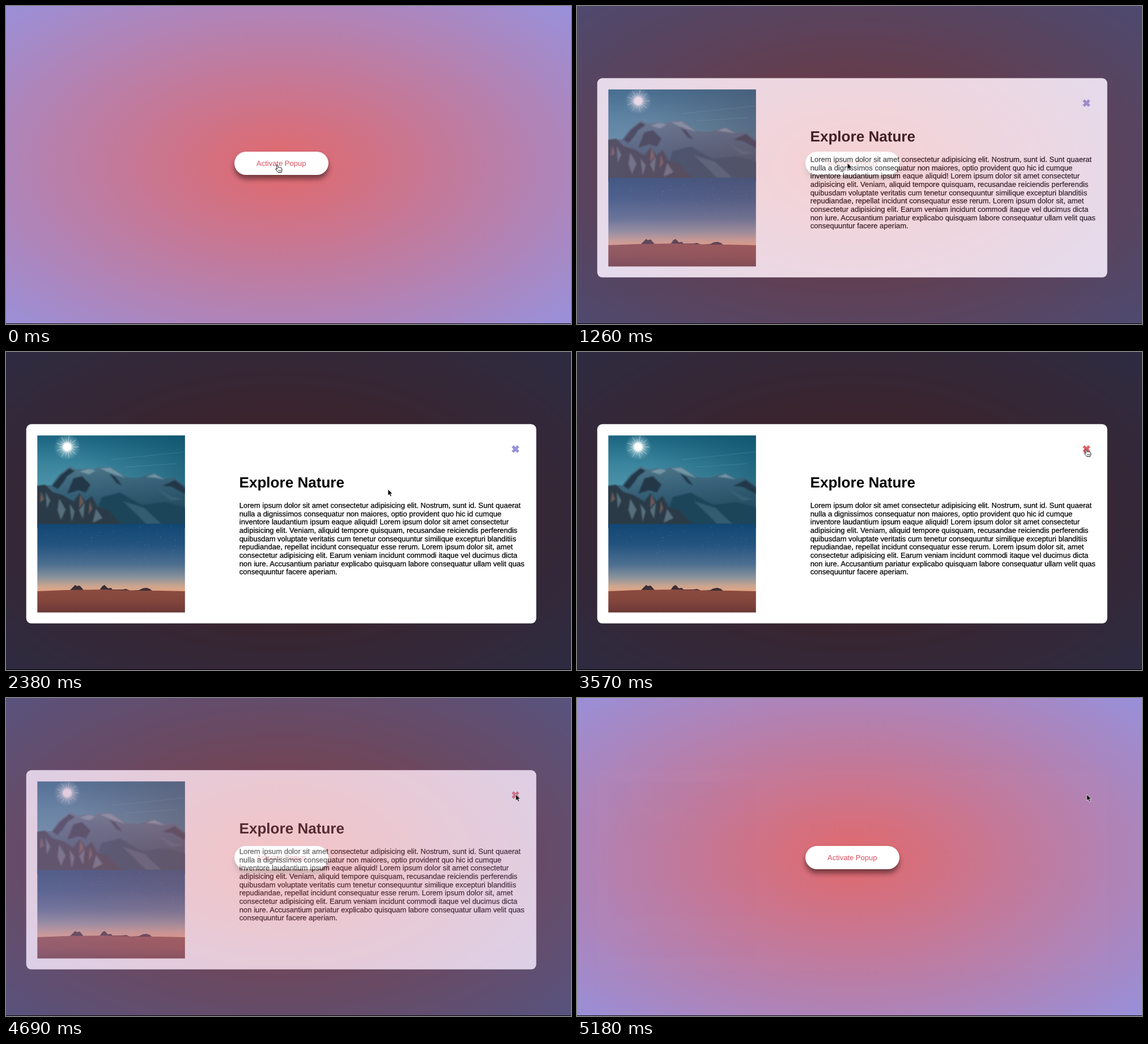
These frames come from a looping animation (997x561 px, 5250 ms). An HTML page:

```html
<!DOCTYPE html>
<html lang="en">
<head>
<meta charset="utf-8">
<title>Popup</title>
<style>
  html, body { margin: 0; width: 100%; height: 100%; overflow: hidden; }
  #stage {
    position: relative; width: 997px; height: 561px; overflow: hidden;
    background: radial-gradient(687px 397px at 485.5px 281px, #e1696c, #9a90d9);
    font-family: "Liberation Sans", Arial, sans-serif;
  }
  #button {
    position: absolute; left: 403px; top: 261px; width: 165.5px; height: 41px;
    border-radius: 21px; background: #fff; box-shadow: 0 7px 10px rgba(0, 0, 0, .48);
  }
  #popup { position: absolute; inset: 0; opacity: 0; background: rgba(0, 0, 0, .7); }
  svg { position: absolute; left: 0; top: 0; overflow: visible; text-rendering: geometricPrecision; }
  #copy { stroke: #000; stroke-width: .25px; }
  #floor { position: absolute; left: 0; top: 560px; width: 997px; height: 1px; background: #000; }
  #cursor { position: absolute; left: 0; top: 0; width: 20px; height: 20px; }
</style>
</head>
<body>
<div id="stage">
  <div id="button">
    <svg width="165" height="41"><text x="82.7" y="24.7" font-size="13" text-anchor="middle" fill="#d94f5e">Activate Popup</text></svg>
  </div>

  <div id="popup">
    <svg width="997" height="561">
      <defs>
        <linearGradient id="day" x2="0" y2="1">
          <stop stop-color="#1a6480"/><stop offset=".5" stop-color="#3a849d"/><stop offset="1" stop-color="#5097ab"/>
        </linearGradient>
        <linearGradient id="shade" x2="1" y2="0">
          <stop offset=".3" stop-color="#08475f" stop-opacity="0"/><stop offset="1" stop-color="#08475f" stop-opacity=".5"/>
        </linearGradient>
        <linearGradient id="snow" x2=".3" y2="1">
          <stop stop-color="#52798c"/><stop offset=".5" stop-color="#355f76"/><stop offset="1" stop-color="#1f4559"/>
        </linearGradient>
        <linearGradient id="dusk" x2="0" y2="1">
          <stop stop-color="#124773"/><stop offset=".3" stop-color="#23537f"/><stop offset=".6" stop-color="#4c6f90"/>
          <stop offset=".8" stop-color="#8d949b"/><stop offset=".92" stop-color="#cba58f"/><stop offset="1" stop-color="#e4a682"/>
        </linearGradient>
        <linearGradient id="sand" x2="0" y2="1">
          <stop stop-color="#8c4b40"/><stop offset=".5" stop-color="#83453c"/><stop offset="1" stop-color="#693835"/>
        </linearGradient>
        <radialGradient id="glow">
          <stop offset=".25" stop-color="#fff"/><stop offset=".45" stop-color="#d5ebee" stop-opacity=".5"/>
          <stop offset="1" stop-color="#8fc4d0" stop-opacity="0"/>
        </radialGradient>
        <filter id="soft"><feGaussianBlur stdDeviation="1"/></filter>
        <clipPath id="frame"><path d="M55.3 147.2H315.8V459.6H55.3z"/></clipPath>
      </defs>

      <rect x="35.7" y="127.3" width="900" height="351.5" rx="9" fill="#fff"/>

      <g clip-path="url(#frame)">
        <path fill="url(#day)" d="M55 147h262v100H55z"/>
        <path fill="url(#shade)" d="M55 147h262v100H55z"/>
        <path d="M185 190L316 176M210 203L300 197" stroke="#7db4c2" stroke-opacity=".25"/>
        <circle cx="108" cy="167.5" r="24" fill="url(#glow)"/>
        <path id="rays" stroke="#fff" stroke-opacity=".6" stroke-width=".8"/>
        <path fill="url(#snow)" d="M50 236L80 235 93 217 104 208 113 201 122 206 132 207 143 204 152 208 166 203 184 203 197 211 213 221 234 222 249 217 262 214 279 224 296 221 320 239V310H50z"/>
        <g filter="url(#soft)">
          <path fill="#83a3b1" fill-opacity=".75" d="M166 205L184 204 197 212 211 222 191 216 178 211zM247 220L262 215 280 225 265 222zM130 211L145 206 158 209 147 216z"/>
          <path fill="#20394a" d="M82 236L96 218 112 205 121 210 108 219 101 230 91 242zM119 223L134 219 149 234 141 248 128 244 108 250zM182 214L193 220 205 236 195 231zM276 236L298 226 316 240V251L293 238z"/>
          <path fill="#1c455a" d="M169 256L201 248 240 270 281 265 320 276V310H151z"/>
          <path fill="#3c667a" fill-opacity=".7" d="M206 263L244 275 274 303H247L225 281zM264 240L293 255 314 260 291 262z"/>
          <path fill="#2c3a46" d="M50 237L69 234 82 247 101 253 119 264 130 249 140 264 151 254 162 274 180 278 192 292 213 310H50z"/>
          <path fill="#647f8d" fill-opacity=".75" d="M70 247L78 262 72 276zM94 259L105 278 97 296 91 279zM129 279L139 266 136 294zM159 277L170 293 153 301zM112 268L121 281 116 299z"/>
          <path fill="#80645f" fill-opacity=".75" d="M131 251L137 265 129 275zM62 246L67 260 60 265zM148 263L152 276 146 287z"/>
        </g>
        <path fill="url(#dusk)" d="M55 303.5h262v119H55z"/>
        <path id="stars" stroke="#b9cee0" stroke-opacity=".5" stroke-width=".8"/>
        <path fill="#3a2d35" d="M111 422L118 415 122 411 125 413 130 412 138 421zM165 420L170 413 174 411 180 417 185 416 188 419 205 419 212 418 219 421 235 420 241 417 248 416 254 418 260 423z"/>
        <path fill="url(#sand)" d="M55 422L105 420 170 419 235 421 270 421 317 422V460H55z"/>
      </g>

      <text x="411.5" y="239.2" font-size="26.08" font-weight="700">Explore Nature</text>
      <text id="copy" font-size="13.03"></text>
      <path id="close" d="M894 166.2L904 176.2M904 166.2L894 176.2" stroke="#9693d9" stroke-width="5"/>
    </svg>
  </div>

  <div id="floor"></div>
  <div id="cursor">
    <svg width="20" height="20">
      <path id="arrow" d="M0 0V11.3L2.6 8.9 4.4 13 6.4 12.1 4.6 8.2H8Z" fill="#000" stroke="#fff" stroke-width=".8"/>
      <g id="hand" stroke="#111" stroke-width="1" stroke-linejoin="round">
        <path fill="#fff" d="M-3 2q1.2-1.2 2.4.2l1.2 4q1.2-1.2 2.2 0q1.2-.9 2.1.3q1.5-.4 1.8 1.2l.3 2.8q0 1.8-1 3.2v.9h-6l-.3-1-3.5-4q-1-1.6.8-1.8l1.6 1.2z"/>
        <path fill="none" stroke-width=".7" d="M1.3 10v2.6M3.2 10v2.6M5 10v2.6"/>
      </g>
    </svg>
  </div>
</div>

<script>
const LOOP = 5250, STEP = 70, FADE = 740;
const OPEN = 955, SHUT = 4510, HOVER = 3220;
const $ = id => document.getElementById(id);
const clamp = v => Math.min(1, Math.max(0, v));

const lines = [
  'Lorem ipsum dolor sit amet consectetur adipisicing elit. Nostrum, sunt id. Sunt quaerat',
  'nulla a dignissimos consequatur non maiores, optio provident quo hic id cumque',
  'inventore laudantium ipsum eaque aliquid! Lorem ipsum dolor sit amet consectetur',
  'adipisicing elit. Veniam, aliquid tempore quisquam, recusandae reiciendis perferendis',
  'quibusdam voluptate veritatis cum tenetur consequuntur similique excepturi blanditiis',
  'repudiandae, repellat incidunt consequatur esse rerum. Lorem ipsum dolor sit, amet',
  'consectetur adipisicing elit. Earum veniam incidunt commodi itaque vel ducimus dicta',
  'non iure. Accusantium pariatur explicabo quisquam labore consequatur ullam velit quas',
  'consequuntur facere aperiam.'
];
$('copy').innerHTML = lines
  .map((line, i) => `<tspan x="411.8" y="${275.2 + i * 14.63}">${line}</tspan>`).join('');

// Sun rays alternate between long and short.
$('rays').setAttribute('d', Array.from({ length: 18 }, (_, i) => {
  const a = i * Math.PI / 9, r = i % 2 ? 14 : 20;
  return `M108 167.5l${r * Math.cos(a)} ${r * Math.sin(a)}`;
}).join(''));

let seed = 7;
const random = () => (seed = seed * 16807 % 2147483647) / 2147483647;
$('stars').setAttribute('d', Array.from({ length: 38 }, () =>
  `M${56 + random() * 258} ${305 + random() * 66}h.9`).join(''));

// The CSS "ease" curve, solved by bisection.
function ease(x) {
  x = clamp(x);
  let lo = 0, hi = 1;
  for (let i = 0; i < 24; i++) {
    const u = (lo + hi) / 2;
    if (.75 * u * (1 - u) + u ** 3 < x) lo = u; else hi = u;
  }
  const v = 1 - lo;
  return .3 * lo * v * v + 3 * lo * lo * v + lo ** 3;
}

const easeIn = u => u ** 1.2;
const easeOut = u => 1 - (1 - u) ** 1.55;
const linear = u => u;

// time, x, y, easing towards this point
const path = [
  [0, 480, 279, linear],
  [280, 477.5, 277, linear],
  [1900, 477, 277, linear],
  [2380, 674, 242, easeIn],
  [2520, 738, 225, linear],
  [3290, 899.5, 170, easeOut],
  [LOOP, 899.5, 170, linear]
];

function pointer(t) {
  const i = path.findIndex((p, n) => n && t <= p[0]);
  const [t0, x0, y0] = path[i - 1], [t1, x1, y1, curve] = path[i];
  const u = curve((t - t0) / (t1 - t0));
  return { transform: `translate(${x0 + (x1 - x0) * u}px, ${y0 + (y1 - y0) * u}px)` };
}

const fade = t => ease((t - OPEN) / FADE) * (1 - ease((t - SHUT) / FADE));
const isHand = t => t < OPEN || (t >= HOVER && t < SHUT);

// Hold each pose for one step; a hair early so a step's own time shows it.
function play(id, pose) {
  const count = LOOP / STEP;
  const frames = Array.from({ length: count + 1 }, (_, i) => ({
    ...pose(Math.min(i, count - 1) * STEP),
    offset: i === count ? 1 : Math.max(0, i * STEP - 1) / LOOP,
    easing: 'steps(1)'
  }));
  $(id).animate(frames, { duration: LOOP, iterations: Infinity });
}

play('popup', t => ({ opacity: fade(t) }));
play('button', t => ({ transform: `translateY(${-4 * (1 - ease((t - 1500) / 300))}px)` }));
play('close', t => ({ stroke: t >= HOVER ? '#df6468' : '#9693d9' }));
play('cursor', pointer);
play('hand', t => ({ opacity: +isHand(t) }));
play('arrow', t => ({ opacity: +!isHand(t) }));
</script>
</body>
</html>
```
